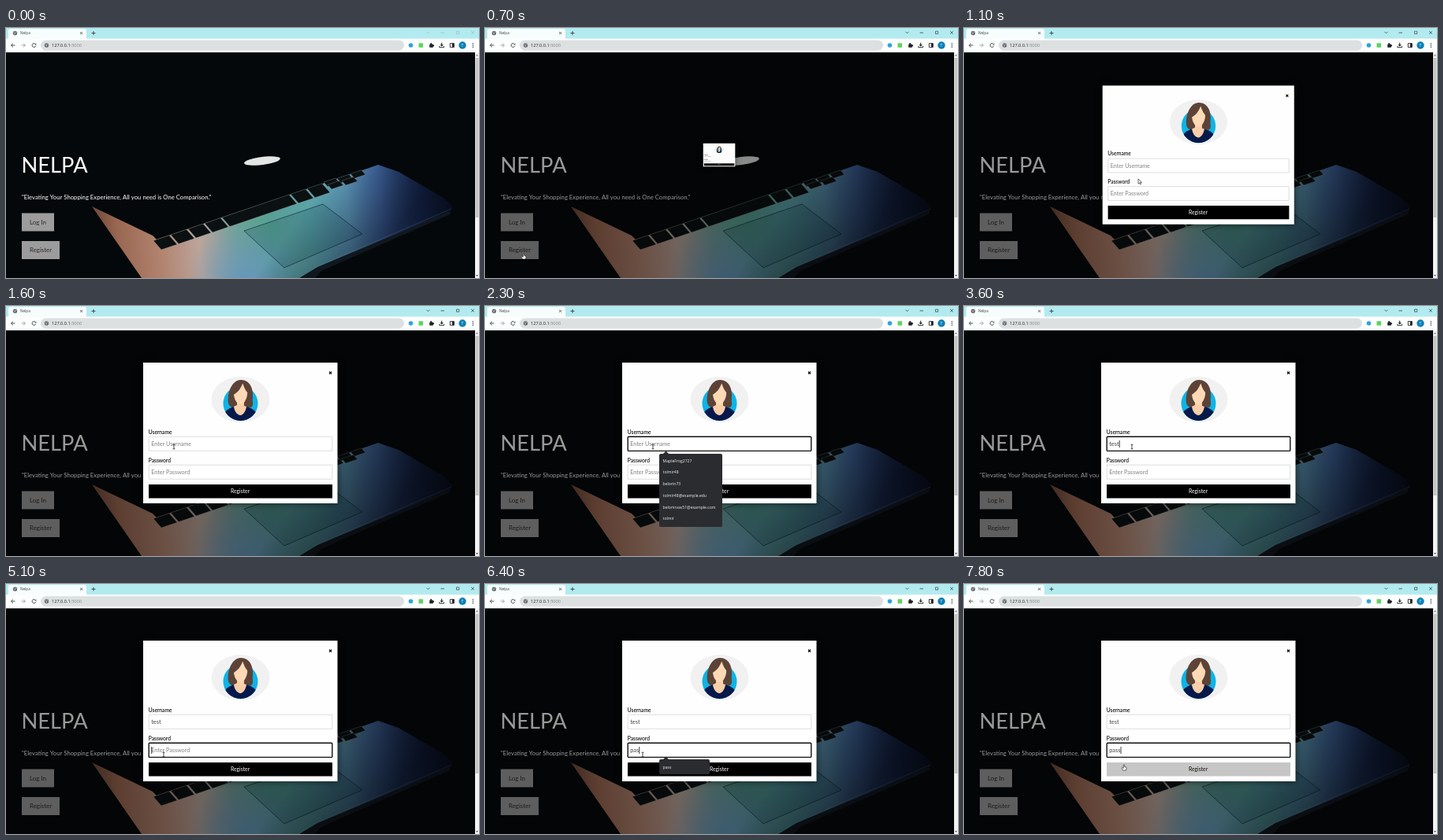
An HTML page with a canvas for the animation above (8000 ms loop, 600 px wide and 318 px high).

```html
<!DOCTYPE html>
<html lang="en">
<head>
<meta charset="utf-8">
<title>Nelpa</title>
<style>
html, body { margin: 0; width: 100%; height: 100%; overflow: hidden; background: #05080a; }
canvas { display: block; width: 600px; height: 318px; }
</style>
</head>
<body>
<canvas id="stage"></canvas>
<script>
const LOOP = 8000, STEP = 100, W = 600, H = 318, TOP = 31, EDGE = 595;
const canvas = document.getElementById('stage');
const ctx = canvas.getContext('2d');
const dpr = window.devicePixelRatio || 1;
canvas.width = W * dpr;
canvas.height = H * dpr;

const PAGE = 'Lato, sans-serif', UI = '"Open Sans", sans-serif';
const NAMES = ['MapleFrog2727', 'tolmir48', 'belorin73', 'tolmir48@example.edu', 'belorinvas51@example.com', 'tolmir'];
// time, x, y of the pointer
const PATH = [[0, 120, 330], [300, 49, 287], [700, 49, 287], [1100, 221, 192], [1500, 213, 179],
  [4000, 213, 179], [4600, 203, 221], [4700, 203, 221], [4900, 200, 217], [7200, 200, 217], [7700, 203, 230]];

function rect(x, y, w, h, fill, r = 0) {
  ctx.fillStyle = fill;
  ctx.beginPath();
  ctx.roundRect(x, y, w, h, r);
  ctx.fill();
}
function frame(x, y, w, h, color, line = 1, r = 0) {
  ctx.strokeStyle = color;
  ctx.lineWidth = line;
  ctx.beginPath();
  ctx.roundRect(x, y, w, h, r);
  ctx.stroke();
}
function oval(x, y, rx, ry, fill, turn = 0) {
  ctx.fillStyle = fill;
  ctx.beginPath();
  ctx.ellipse(x, y, rx, ry, turn, 0, Math.PI * 2);
  ctx.fill();
}
function trace(pts, close) {
  ctx.beginPath();
  pts.forEach(([x, y]) => ctx.lineTo(x, y));
  if (close) ctx.closePath();
}
function poly(pts, fill) {
  trace(pts, true);
  ctx.fillStyle = fill;
  ctx.fill();
}
function line(pts, color, width = 1, close = false) {
  trace(pts, close);
  ctx.strokeStyle = color;
  ctx.lineWidth = width;
  ctx.stroke();
}
function shape(d, fill, stroke, width = .7) {
  const p = new Path2D(d);
  if (fill) { ctx.fillStyle = fill; ctx.fill(p); }
  if (stroke) { ctx.strokeStyle = stroke; ctx.lineWidth = width; ctx.stroke(p); }
}
function text(s, x, y, size, color, font = PAGE, weight = 400, align = 'left') {
  ctx.font = `${weight} ${size}px ${font}`;
  ctx.fillStyle = color;
  ctx.textAlign = align;
  ctx.textBaseline = 'alphabetic';
  ctx.fillText(s, x, y);
  return ctx.measureText(s).width;
}
function shade(g, stops) {
  stops.forEach(([at, c]) => g.addColorStop(at, c));
  return g;
}
function glow(x, y, r, rgb, alpha) {
  rect(x - r, y - r, 2 * r, 2 * r, shade(ctx.createRadialGradient(x, y, 0, x, y, r),
    [[0, `rgba(${rgb},${alpha})`], [1, `rgba(${rgb},0)`]]));
}

function ease(p) {
  if (p <= 0) return 0;
  if (p >= 1) return 1;
  const bez = (a, b, u) => 3 * a * u * (1 - u) ** 2 + 3 * b * u * u * (1 - u) + u ** 3;
  let lo = 0, hi = 1;
  for (let i = 0; i < 24; i++) {
    const mid = (lo + hi) / 2;
    if (bez(.25, .25, mid) < p) lo = mid; else hi = mid;
  }
  return bez(.1, 1, lo);
}
function pointer(t) {
  const i = PATH.findIndex(k => k[0] > t);
  if (i < 0) return PATH[PATH.length - 1].slice(1);
  const [t0, x0, y0] = PATH[i - 1], [t1, x1, y1] = PATH[i];
  const p = (t - t0) / (t1 - t0), s = p * p * (3 - 2 * p);
  return [x0 + (x1 - x0) * s, y0 + (y1 - y0) * s];
}
// text typed so far, one letter per listed time
const typed = (word, times, t) => word.slice(0, times.filter(k => t >= k).length);

function globe(x, y) {
  oval(x, y, 2.7, 2.7, '#5f6368');
  line([[x - 1.8, y - .8], [x, y + .2], [x - .5, y + 1.8]], '#e4e8ea', .8);
  line([[x + .3, y - 1.8], [x + 1.7, y - .3]], '#e4e8ea', .8);
}
function cross(x, y, r, color, width) {
  line([[x - r, y - r], [x + r, y + r]], color, width);
  line([[x - r, y + r], [x + r, y - r]], color, width);
}

function browser(active) {
  const ink = '#3c4043', control = active ? ink : '#92bfc3';
  rect(0, 0, W, 14, '#b2ebef');
  rect(3, 1, 99, 16, '#f7fdfd', 3);
  rect(0, 13.5, W, TOP - 13.5, '#fdfefe');
  globe(11.5, 6.5);
  text('Nelpa', 18, 8.3, 4.7, ink, UI);
  cross(95.5, 6.5, 1.5, ink, .8);
  line([[108.5, 6.5], [113.5, 6.5]], ink, .9);
  line([[111, 4], [111, 9]], ink, .9);
  line([[533.5, 4.8], [535.5, 6.8], [537.5, 4.8]], control, .8);
  line([[551.5, 6], [556, 6]], control, .8);
  frame(571.5, 4.2, 3.2, 3.2, control, .7);
  cross(592, 5.8, 1.8, control, .8);

  line([[11.5, 22], [6.5, 22]], ink, .9);
  line([[9, 19.6], [6.5, 22], [9, 24.4]], ink, .9);
  line([[19.5, 22], [24.5, 22]], '#9aa0a6', .9);
  line([[22, 19.6], [24.5, 22], [22, 24.4]], '#9aa0a6', .9);
  ctx.beginPath();
  ctx.arc(35.5, 22, 2.4, .3, 5.4);
  ctx.strokeStyle = ink;
  ctx.lineWidth = .9;
  ctx.stroke();
  poly([[36.3, 21.4], [38.4, 21.4], [38.4, 19.2]], ink);

  rect(44, 15.5, 461, 13, '#dde0e1', 6.5);
  globe(51.5, 22);
  const w = text('127.0.0.1', 58, 24, 5.6, '#202124', UI);
  text(':5000', 58 + w, 24, 5.6, '#80868b', UI);

  oval(513.5, 22, 2.8, 2.8, '#2aa5dc');
  rect(523.5, 19.2, 5.6, 5.6, '#5fd35f', .5);
  rect(537.2, 20.4, 4.6, 4.4, '#202124', .6);
  oval(539.2, 20, 1.1, 1.1, '#202124');
  oval(542, 22.4, 1.1, 1.1, '#202124');
  line([[552.7, 18.8], [552.7, 22.6]], '#202124', 1.1);
  poly([[550.4, 21.2], [555, 21.2], [552.7, 23.5]], '#202124');
  line([[549.8, 23], [549.8, 24.7], [555.6, 24.7], [555.6, 23]], '#202124', .9);
  frame(563.3, 19.6, 5, 4.8, '#202124', .9);
  rect(566, 19.6, 2.3, 4.8, '#202124');
  oval(579, 22, 4.7, 4.7, '#0b80b5');
  text('T', 579, 23.8, 5, '#fff', UI, 400, 'center');
  [-2.2, 0, 2.2].forEach(d => oval(592.3, 22 + d, .75, .75, ink));

  rect(EDGE, TOP, W - EDGE, H - TOP, '#f3f3f3');
  rect(595.6, 38, 3.8, 203, '#c3c3c3');
  poly([[596, 35.5], [597.5, 33.5], [599, 35.5]], '#777');
  poly([[596, 314], [597.5, 316], [599, 314]], '#555');
}

function laptop() {
  poly([[565, 229], [395, 303], [372, 318], [392, 318], [400, 309], [563, 237]], '#10171f');
  const deck = [[109, 227], [186, 264], [191, 269], [452, 181], [472, 174], [498, 183], [556, 217], [566, 227],
    [565, 232], [395, 304], [372, 318], [172, 318]];
  ctx.save();
  trace(deck, true);
  ctx.clip();
  rect(100, 165, 470, 153, shade(ctx.createLinearGradient(110, 262, 566, 218), [[0, '#6b4536'],
    [.07, '#9a6852'], [.19, '#b38572'], [.29, '#bba59b'], [.39, '#82a09c'], [.49, '#5d9c98'],
    [.61, '#5aa3a8'], [.71, '#629fbf'], [.8, '#4a74b2'], [.9, '#22386a'], [1, '#080d18']]));
  glow(315, 250, 55, '70,170,135', .4);
  glow(305, 322, 75, '95,150,192', .85);
  rect(300, 165, 270, 153, shade(ctx.createLinearGradient(385, 225, 470, 290),
    [[0, 'rgba(6,12,28,0)'], [1, 'rgba(6,12,28,.65)']]));
  ctx.restore();
  line([[565, 230], [395, 303], [372, 317]], 'rgba(100,140,170,.3)', .8);

  const pad = [[302, 258], [402, 224], [452, 262], [353, 305]];
  poly(pad, 'rgba(10,50,65,.18)');
  line(pad, 'rgba(8,26,36,.65)', .9, true);

  // keys lie on one slanted row: [start, width, depth, lift]
  const slope = -.34;
  const key = ([x, w, d = 1, lift = 0]) => {
    const y = 270.5 + (x - 187) * slope - lift, dx = 10 * d, dy = 11.5 * d;
    const pts = [[x, y], [x + w, y + w * slope], [x + w + dx, y + w * slope + dy], [x + dx, y + dy]];
    poly(pts, '#0b1012');
    line(pts, 'rgba(175,190,185,.45)', .6, true);
  };
  [[187, 20], [209, 20], [231, 19], [252, 20], [274, 85], [361, 19], [382, 19], [403, 15, .5, 1],
    [408, 15, .5, -4], [420, 15, .5, 0], [426, 15, .5, -5], [437, 14, .5, 0]].forEach(key);
  oval(325, 169, 23, 5, '#e4e6e6', -.13);
}

function button(label, y, w) {
  rect(20, y, w, 23, '#9c9c9c');
  text(label, 20 + w / 2, y + 14, 7.9, '#2c2c2c', PAGE, 400, 'center');
}
function page(dim) {
  rect(0, TOP, EDGE, H - TOP, '#05080a');
  laptop();
  text('NELPA', 19.5, 184, 27.3, '#fff');
  text('"Elevating Your Shopping Experience, All you need is One Comparison."', 20, 218, 7.73, '#fff');
  button('Log In', 235.5, 41);
  button('Register', 271, 48);
  if (dim) rect(0, TOP, EDGE, H - TOP, 'rgba(0,0,0,.4)');
}

function avatar() {
  oval(297.5, 119, 37, 29, '#f1f1f1');
  oval(297.5, 124, 22, 22, '#0db4e6');
  shape('M283 126C279 118 284 95 297 94C309 93 314 105 313 116C312 122 315 126 311 129L287 130Z', '#5d4337');
  ctx.save();
  ctx.beginPath();
  ctx.arc(297.5, 124, 22, 0, Math.PI * 2);
  ctx.clip();
  shape('M275 146C276 132 283 130 290 128L304 128C313 130 319 133 320 146Z', '#06194a');
  ctx.restore();
  shape('M293 118H302V127L305 128C304 135 300 139 297.5 139C294 139 290 135 289 128L293 126Z', '#f8cfa9');
  shape('M289 111C289 104 293 99 299 98C305 100 307 106 306 113C305 120 301 125 298 125C293 125 289 119 289 111Z', '#fdd9b5');
  shape('M301 96C298 106 293 111 286.5 114C287 104 292 97 301 96Z', '#5d4337');
  shape('M300 97C302 105 305 109 308 112L309 103Z', '#5d4337');
}

function field(y, value, hint, focus, caret) {
  rect(181, y, 233, 18.5, '#fff');
  if (focus) frame(181.2, y + .2, 232.6, 18.2, '#101010', 1.4, 1);
  else frame(181.2, y + .2, 232.6, 18, '#cfcfcf', .7);
  const w = text(value, 184.2, y + 12, 7.4, '#444');
  if (!value) text(hint, 184.2, y + 12, 7.2, '#808080');
  if (caret) rect(184.4 + w, y + 5, .8, 9, '#111');
}
function dialog(t, hot) {
  const s = ease((t - 621) / 566);
  if (s <= 0) return;
  ctx.save();
  ctx.translate(297, 161.5);
  ctx.scale(s, s);
  ctx.translate(-297, -161.5);
  ctx.shadowColor = 'rgba(0,0,0,.6)';
  ctx.shadowBlur = 8 * dpr;
  rect(174, 72, 246.5, 179, '#fefefe');
  ctx.shadowColor = 'transparent';
  cross(411.5, 85, 1.5, '#000', 1.1);
  avatar();
  text('Username', 180.7, 162.5, 6.7, '#000', PAGE, 500);
  text('Password', 180.7, 198.8, 6.7, '#000', PAGE, 500);
  const user = typed('test', [3000, 3200, 3400, 3600], t);
  const pass = typed('pass', [6000, 6200, 6400, 6800], t);
  const first = t >= 1800 && t < 5100, second = t >= 5100;
  const blink = (t >= 2300 && t < 2900) || (t >= 4100 && t < 4600) || (t >= 5600 && t < 6000);
  field(166, user, 'Enter Username', first, first && !blink);
  field(202, pass, 'Enter Password', second, second && !blink);
  rect(181, 227, 233, 17.5, hot ? '#c6c6c6' : '#000');
  text('Register', 297, 238, 6.8, hot ? '#111' : '#fff', PAGE, 400, 'center');
  ctx.restore();
}

function menu(y, w, h, items) {
  rect(221, y, w, h, '#2b2c2f', 2);
  poly([[225.5, y + .5], [229.5, y - 3.5], [233.5, y + .5]], '#2b2c2f');
  items.forEach((s, i) => text(s, 225.6, y + (h < 30 ? 11.6 : 10.7) + i * 14.75, 5.1, '#f1f1f1', UI));
}

function cursor(t, x, y, hand) {
  ctx.save();
  ctx.translate(x, y);
  const inField = t >= 1200 && (Math.abs(y - 175) < 9.5 || Math.abs(y - 211) < 9.5);
  if (hand) {
    shape('M-.7 .2Q0 -.7 .7 .2V2.5L3 3.3V5L2.3 7H-1.3L-3 4.2L-2.3 3.5L-.7 4.3Z', '#fff', '#111', .6);
  } else if (inField) {
    shape('M-1.4 -2.8H1.4M0 -2.8V2.8M-1.4 2.8H1.4', null, '#222', .8);
  } else {
    shape('M0 0V6.2L1.5 4.9L2.5 7L3.5 6.5L2.5 4.5H4.5Z', '#fff', '#111', .6);
  }
  ctx.restore();
}

function draw(t) {
  const [x, y] = pointer(t);
  const onPage = t < 800 && x < 68 && y < 294;
  const onForm = t > 7200 && y > 227;
  ctx.setTransform(dpr, 0, 0, dpr, 0, 0);
  page(t >= 700);
  browser(t >= 500);
  dialog(t, onForm);
  if (t >= 1900 && t < 3000) menu(188, 80, 93, NAMES);
  if (t >= 6000 && t < 7000) menu(223, 64, 19, ['pass']);
  cursor(t, x, y, onPage || onForm);
}

const start = performance.now();
function tick() {
  const t = (performance.now() - start) % LOOP;
  draw(Math.floor(t / STEP) * STEP);
  requestAnimationFrame(tick);
}
tick();
</script>
</body>
</html>
```
